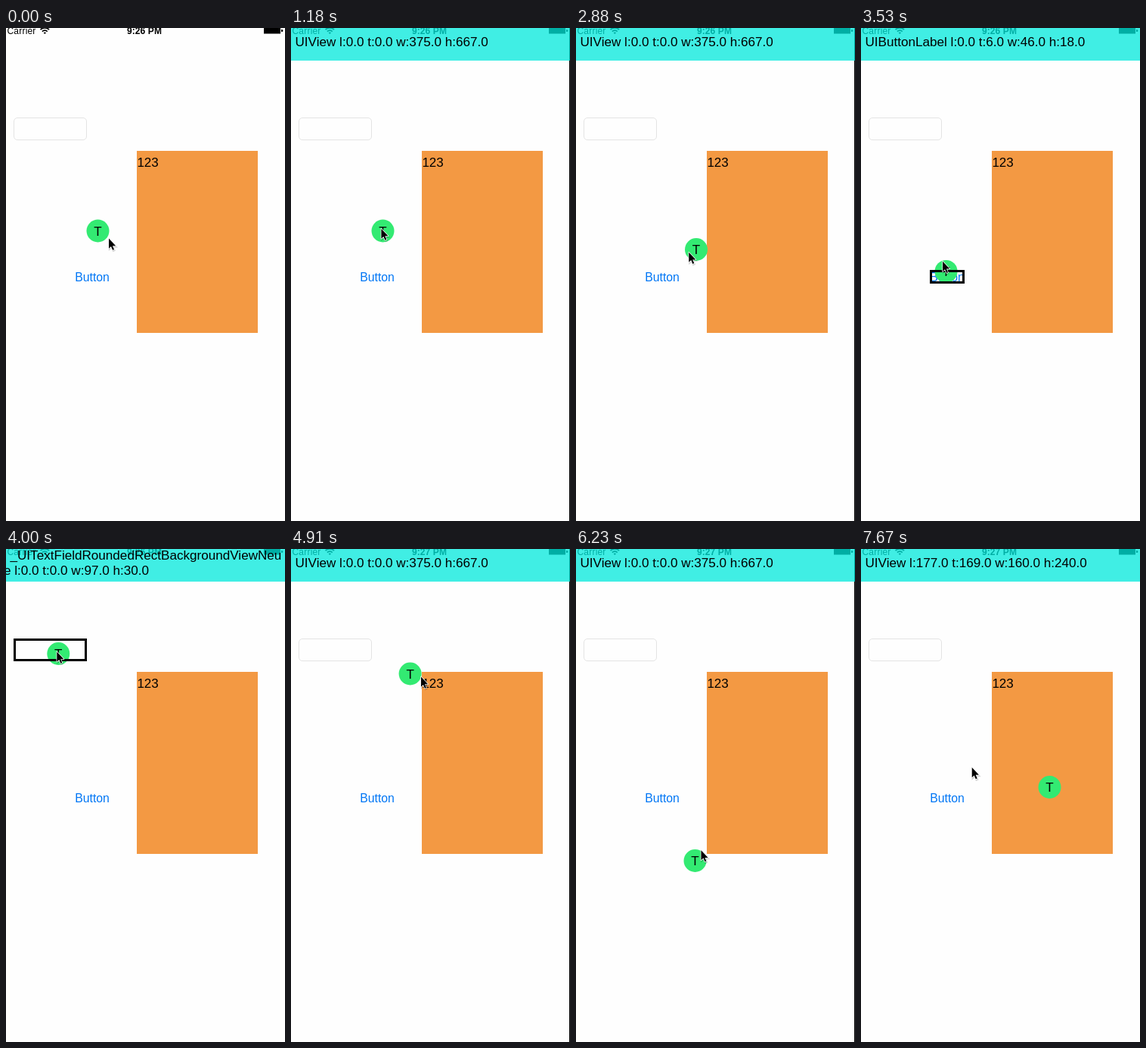
An HTML page that plays this animation: 369 by 650 pixels, repeating every 8 s.

```html
<!DOCTYPE html>
<html lang="en">
<head>
<meta charset="utf-8">
<title>View inspector</title>
<style>
  html, body { margin: 0; width: 100%; height: 100%; overflow: hidden; background: #fefefe; }
  svg { display: block; width: 369px; height: 650px; }
  text { font-family: "Liberation Sans", Arial, sans-serif; font-size: 17px; white-space: pre; }
  .status text { font-size: 12px; }
  #panel text { font-size: 17.1px; }
</style>
</head>
<body>
<svg viewBox="0 0 369 650">
  <defs>
    <path id="arrow" d="M0 0v14.6l3.3-3 2.3 5.3 2.2-.9-2.3-5.2h4.7z"/>
  </defs>
  <rect width="369" height="650" fill="#fefefe"/>

  <g class="status">
    <text x="1.5" y="7.5" letter-spacing=".2">Carrier</text>
    <g fill="none" stroke="#000" stroke-width="1.7">
      <path d="M45.5 2.2a8.2 8.2 0 0 1 11.6 0M47.9 4.6a4.8 4.8 0 0 1 6.8 0"/>
      <path d="M51.3 8l-1.7-1.7a2.4 2.4 0 0 1 3.4 0z" fill="#000" stroke="none"/>
    </g>
    <text id="clock" x="183" y="7.5" text-anchor="middle" font-weight="700" letter-spacing=".1">9:26 PM</text>
    <path d="M341 -1h22v8.5h-22zM364 2h1q1.4 0 1.4 1.5t-1.4 1.5h-1z"/>
  </g>

  <rect x="10.5" y="118.5" width="96" height="29" rx="4.5" fill="#fefefe" stroke="#e4e4e4"/>
  <rect x="173" y="162" width="160" height="240" fill="#f39943"/>
  <text x="173.4" y="183">123</text>
  <text x="91.2" y="334" style="font-size:15.8px" fill="#0076f5">Button</text>

  <g id="ball">
    <circle r="15" fill="#33ea72"/>
    <text y="6" text-anchor="middle">T</text>
  </g>

  <rect id="border" fill="none" stroke="#000" stroke-width="3"/>

  <g id="panel">
    <rect width="369" height="43" fill="rgb(0,232,219)" fill-opacity=".75"/>
    <text id="line1" x="5.5"></text>
    <text id="line2" x="-3" y="34"></text>
  </g>

  <g id="cursor">
    <g transform="translate(0 .5) scale(.9)">
      <use href="#arrow" x=".8" y="1.6" stroke="#000" stroke-width="2" opacity=".16"/>
      <use href="#arrow" stroke="#fff" stroke-width="1.6" stroke-linejoin="round" paint-order="stroke"/>
    </g>
  </g>
</svg>
<script>
const LOOP = 8000, STEP = 57, LAG = 40;
const $ = id => document.getElementById(id);

// Each drag leg: start time, then the points it passes as time, x, y
const home = [121.5, 267.5];
const legs = [
  [1180, [1770, 162.5, 236.5], [1980, 228.5, 235.5]],
  [2600, [2880, 159, 292], [3230, 114, 327]],
  [3470, [4000, 69.3, 138]],
  [4540, [5300, 277, 268], [5420, 262, 312], [5870, 146, 428]],
  [6110, [6230, 157.5, 411], [6510, 249.5, 314]]
];
const keys = [[0, ...home]];
const rest = t => keys.push([t, ...keys.at(-1).slice(1)]);
for (const [start, ...points] of legs) {
  rest(start);
  keys.push(...points);
}
rest(LOOP);

const approach = { start: 410, end: 890 }, leave = { start: 7230, end: 7670 };
const anchors = [...keys.map(k => k[0]), approach.start, leave.start].sort((a, b) => a - b);

const views = [
  { name: "_UITextFieldRoundedRectBackgroundViewNeue", x: 10, y: 118, w: 97, h: 30, l: 0, t: 0 },
  { name: "UIButtonLabel", x: 91, y: 319, w: 46, h: 18, l: 0, t: 6 },
  { name: "UIView", x: 173, y: 162, w: 160, h: 240, l: 177, t: 169 },
  { name: "UIView", x: -4, y: -7, w: 375, h: 667, l: 0, t: 0 }
];
const LINE = 40;
const caption = v => v.name + ["l", "t", "w", "h"].map(k => ` ${k}:${v[k].toFixed(1)}`).join("");

function slope(i, c) {
  const a = keys[i - 1], b = keys[i], d = keys[i + 1];
  if (!a || !d) return 0;
  const h0 = b[0] - a[0], h1 = d[0] - b[0];
  const s0 = (b[c] - a[c]) / h0, s1 = (d[c] - b[c]) / h1;
  return s0 * s1 <= 0 ? 0 : (s0 * h1 + s1 * h0) / (h0 + h1);
}

function ballAt(t) {
  const i = keys.findLastIndex((k, n) => k[0] <= t && n < keys.length - 1);
  const a = keys[i], b = keys[i + 1], h = b[0] - a[0];
  const u = (t - a[0]) / h, v = 1 - u;
  return [1, 2].map(c =>
    a[c] * v * v * (1 + 2 * u) + b[c] * u * u * (1 + 2 * v) +
    h * u * v * (slope(i, c) * v - slope(i + 1, c) * u));
}

const ease = u => u * u * (3 - 2 * u);
const progress = (t, { start, end }) => Math.min(1, Math.max(0, (t - start) / (end - start)));
const mix = (a, b, k) => a.map((p, i) => p + (b[i] - p) * k);

// While dragging, the ball trails the cursor by LAG
function cursorAt(t) {
  const [bx, by] = ballAt(Math.min(t + LAG, LOOP)), grip = [bx - 2, by - 3];
  if (t >= leave.start) return mix(grip, [144.2, 287], ease(progress(t, leave)));
  if (t > approach.end) return grip;
  const u = progress(t, approach), bend = Math.sin(Math.PI * u);
  const [x, y] = mix([136, 277], grip, ease(u));
  return [x - 3 * bend, y + 14 * bend * (1 - u)];
}

function snap(t) {
  const start = anchors.findLast(a => a <= t);
  return start + Math.floor((t - start) / STEP) * STEP;
}

const place = (el, [x, y]) => el.setAttribute("transform", `translate(${x.toFixed(2)} ${y.toFixed(2)})`);
const show = (el, on) => { el.style.display = on ? "" : "none"; };

function draw(now) {
  const t = now % LOOP, s = snap(t), pos = ballAt(s), [x, y] = pos;
  const view = views.find(v => x >= v.x && x < v.x + v.w && y >= v.y && y < v.y + v.h);
  const text = caption(view), wraps = view.name.length > LINE;

  place($("ball"), pos);
  place($("cursor"), cursorAt(s));
  show($("panel"), t >= 1180);
  show($("border"), t >= 1180 && t < 6990);

  const box = { x: view.x + 1.5, y: view.y + 1.5, width: view.w - 3, height: view.h - 3 };
  for (const k in box) $("border").setAttribute(k, box[k]);

  $("line1").textContent = wraps ? text.slice(0, LINE) : text;
  $("line1").setAttribute("y", wraps ? 14 : 24);
  $("line2").textContent = wraps ? text.slice(LINE) : "";
  $("clock").textContent = t < 4800 ? "9:26 PM" : "9:27 PM";
}

const began = performance.now();
function tick() {
  draw(performance.now() - began);
  requestAnimationFrame(tick);
}
tick();
</script>
</body>
</html>
```
